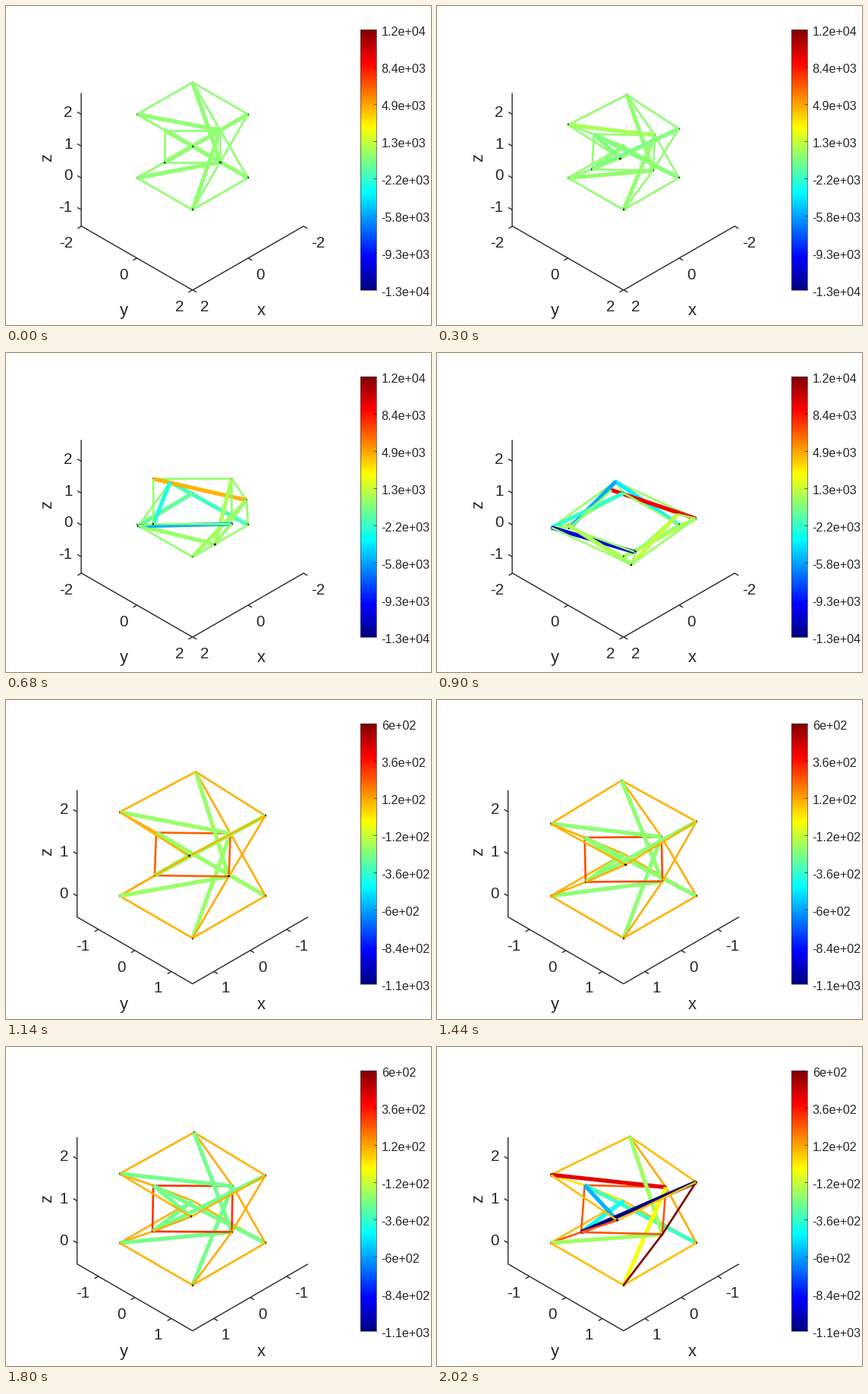
Recreate the animation shown at these times as a matplotlib script. Size 560 px wide and 420 px high, loop 2040 ms.

```python
import numpy as np
import matplotlib.pyplot as plt
from matplotlib.animation import FuncAnimation
from matplotlib.collections import LineCollection

W, H, DPI = 560, 420, 100
HALF = 51                     # frames per scene
PX = 72 / DPI                 # points per pixel
INK = (0.15, 0.15, 0.15)
CX = 245.8

plt.rcParams["font.family"] = "Liberation Sans"
fig = plt.figure(figsize=(W / DPI, H / DPI), dpi=DPI, facecolor="white")
ax = fig.add_axes([0, 0, 1, 1])
ax.axis("off")


def jet(levels):
    """Symmetric blue-cyan-yellow-red ramp."""
    v = np.clip(levels, 0, 1)[..., None]
    return np.clip(1.5 - np.abs(4 * v - np.array([3, 2, 1])), 0, 1)


class View:
    """Isometric view: pixels per unit, screen height of z = 0, axis limits."""

    def __init__(self, ux, uy, uz, y0, lim, zmin, zmax):
        self.ux, self.uy, self.uz, self.y0 = ux, uy, uz, y0
        self.lim, self.zmin, self.zmax = lim, zmin, zmax

    def __call__(self, p):
        x, y, z = np.asarray(p, float).T
        return np.column_stack([CX + (y - x) * self.ux,
                                self.y0 + (x + y) * self.uy - z * self.uz])


VIEWS = [View(36.5, 21.0, 41.9, 226.4, 2.01, -1.51, 2.67),
         View(48.0, 27.75, 55.4, 258.0, 1.585, -0.5, 2.515)]


def label(x, y, s, size, ha="center", va="center_baseline", **kw):
    return ax.text(x, y, s, fontsize=size * PX, color=INK, ha=ha, va=va, **kw)


def line(xs, ys, width=1.4):
    return ax.plot(xs, ys, color=INK, lw=width * PX, solid_capstyle="butt")[0]


def build_axes(v, xy_ticks, z_ticks, bar_labels):
    L, zb = v.lim, v.zmin
    items = [line(*v([(L, -L, v.zmax), (L, -L, zb), (L, L, zb), (-L, L, zb)]).T)]
    for t in xy_ticks:
        (xa, xb), (ya, yb) = v([(t, L, zb), (L, t, zb)])
        items += [line([xa, xa + 5], [xb, xb + 3]), line([ya, ya - 5], [yb, yb + 3]),
                  label(xa + 10, xb + 20.5, str(t), 20.5, ha="left"),
                  label(ya - 11.5, yb + 20.5, str(t), 20.5, ha="right")]
    for t in z_ticks:
        x, y = v([(L, -L, t)])[0]
        items += [line([x, x - 5], [y, y - 3]),
                  label(x - 11.5, y - 4.5, str(t), 20.5, ha="right")]
    items += [label(336.5, 399, "x", 22), label(155, 399, "y", 22),
              label(55, 199.5, "z", 22, va="center", rotation=90)]
    for i, s in enumerate(bar_labels):
        items.append(label(494.7, 33 + 49 * i, s, 16.1, ha="left"))
    return items


AXES = [
    build_axes(VIEWS[0], (-2, 0, 2), (-1, 0, 1, 2),
               ["1.2e+04", "8.4e+03", "4.9e+03", "1.3e+03",
                "-2.2e+03", "-5.8e+03", "-9.3e+03", "-1.3e+04"]),
    build_axes(VIEWS[1], (-1, 0, 1), (0, 1, 2),
               ["6e+02", "3.6e+02", "1.2e+02", "-1.2e+02",
                "-3.6e+02", "-6e+02", "-8.4e+02", "-1.1e+03"]),
]

# colour bar
LEFT, RIGHT, TOP, BOTTOM = 467, 488, 31, 374
ax.imshow(jet(np.linspace(1, 0, 256))[:, None], aspect="auto",
          extent=(LEFT, RIGHT, BOTTOM, TOP), interpolation="nearest")
for k in range(1, 7):
    line([RIGHT - 4, RIGHT], [TOP + 49 * k] * 2, 0.7)
line([LEFT, RIGHT, RIGHT, LEFT, LEFT], [TOP, TOP, BOTTOM, BOTTOM, TOP], 0.6)
ax.set_xlim(0, W)
ax.set_ylim(H, 0)

# nodes: 0-3 bottom, 4-7 middle, 8-11 top
K = range(4)
STRUTS = [(k, 4 + (k + 2) % 4) for k in K] + [(8 + k, 4 + (k + 3) % 4) for k in K]
CABLES = [(k, 4 + (k + 1) % 4) for k in K] + [(8 + k, 4 + k) for k in K]
RINGS = [(b + k, b + (k + 1) % 4) for b in (4, 0, 8) for k in K]
BARS = np.array(STRUTS + CABLES + RINGS)
WIDTHS = np.array([5.33] * 8 + [2.67] * 20 + [2.4] * 12) * PX

# colour levels along the bar, in the order of BARS
REST = 0.515
BUCKLED = np.array([.53, .44, .47, .53, .405, .30, .54, .70] + [.52] * 20)
TWISTED = np.array([.615, .435, .38, .53, .30, 0, .53, .90,
                    1, .71, .65, .79, .79, 1, .71, .65] + [.79] * 4 + [.69] * 8)


def ring(radius, start, z):
    a = np.radians(start + 90 * np.arange(4))
    return np.column_stack([radius * np.cos(a), radius * np.sin(a), np.full(4, z)])


def tower(top, mid, twist):
    """Two-stage tower; the middle radius keeps the struts at length sqrt(6)."""
    c = np.sqrt(2) * np.cos(np.radians(135 + twist / 2))
    r = c + np.sqrt(c * c + 4 - mid ** 2)
    return np.vstack([ring(np.sqrt(2), 45, 0), ring(r, twist / 2, mid),
                      ring(np.sqrt(2), 45 + twist, top)])


def spline(n, xs, ys):
    """Cubic Hermite curve through a few keys."""
    xs, ys = np.array(xs, float), np.array(ys, float)
    m = np.gradient(ys, xs)
    i = min(max(np.searchsorted(xs, n) - 1, 0), len(xs) - 2)
    h = xs[i + 1] - xs[i]
    u = (n - xs[i]) / h
    return ((1 + 2 * u) * (1 - u) ** 2 * ys[i] + u * (1 - u) ** 2 * h * m[i]
            + u * u * (3 - 2 * u) * ys[i + 1] + u * u * (u - 1) * h * m[i + 1])


def collapse(n):
    top = 2 - 1.26 * (n / 34) ** 1.43
    s = lambda q: 1 / (1 + np.exp((34 - q) / 6.03))
    twist = -90 * (s(n) - s(0) * (1 - n / 50))
    levels = REST + (BUCKLED - REST) * (n / 34) ** 2.5
    return tower(top, top / 2, twist), levels


KEYS = (0, 6, 21, 39, 50)


def compress(n):
    top = spline(n, KEYS, (2, 1.95, 1.742, 1.625, 1.533))
    mid = spline(n, KEYS, (1, .985, .868, .812, .79))
    twist = spline(n, KEYS, (0, -2.5, 1.5, -1.2, -5))
    strut = np.interp(n, KEYS[1:4], (.525, .512, .49))
    middle = np.interp(n, KEYS[1:4], (.78, .80, .825))
    even = np.array([strut] * 8 + [.705] * 8 + [middle] * 4 + [.70] * 8)
    mix = max(0, (n - 39) / 11) ** 2
    return tower(top, mid, twist), even + (TWISTED - even) * mix


bars = LineCollection([], capstyle="butt", zorder=3)
ax.add_collection(bars, autolim=False)


def draw(i):
    scene, n = divmod(i, HALF)
    for k, items in enumerate(AXES):
        for item in items:
            item.set_visible(k == scene)
    nodes, levels = (collapse, compress)[scene](n)
    pts = VIEWS[scene](nodes)
    dots = np.stack([pts - (1.2, 0), pts + (1.2, 0)], axis=1)
    segs = np.concatenate([pts[BARS], dots])
    near = nodes.sum(axis=1)
    depth = np.concatenate([near[BARS].mean(axis=1), near + 0.01])
    order = np.argsort(depth, kind="stable")
    colors = np.vstack([jet(levels), np.full((12, 3), 0.05)])
    bars.set_segments(segs[order])
    bars.set_color(colors[order])
    bars.set_linewidth(WIDTHS[order])
    return [bars]


anim = FuncAnimation(fig, draw, frames=2 * HALF, interval=20, repeat=True,
                     repeat_delay=0, blit=False)
plt.show()
```
